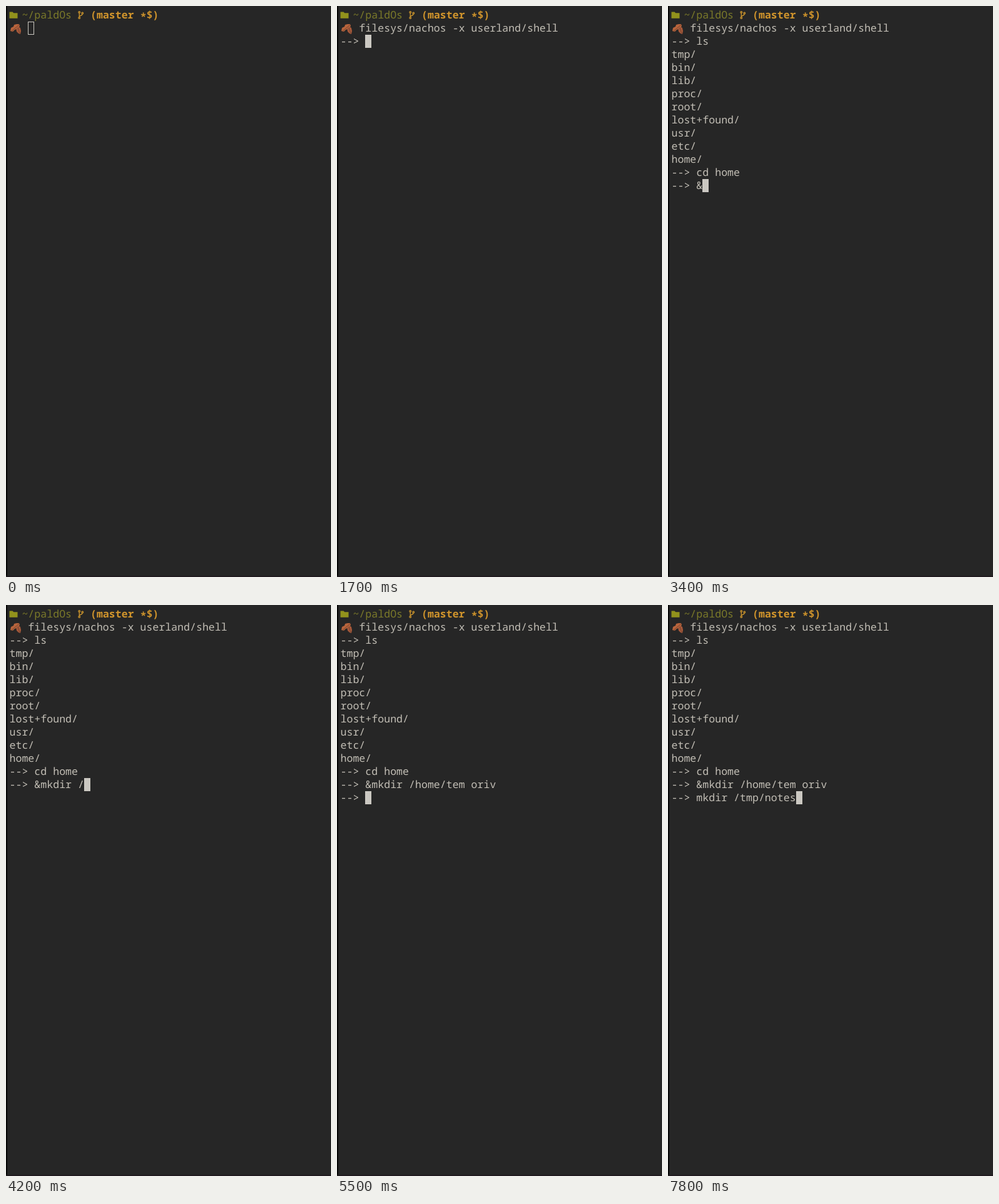
Recreate the animation shown at these times as an HTML page. Size 520x914 px, loop 8000 ms.

```html
<!DOCTYPE html>
<html lang="en">
<head>
<meta charset="utf-8">
<title>Shell session</title>
<style>
  html, body { margin: 0; width: 100%; height: 100%; overflow: hidden; background: #262626; }
  svg { display: block; width: 520px; height: 914px; }
  text {
    font: 16.6px "Noto Sans Mono", "DejaVu Sans Mono", monospace;
    text-rendering: geometricPrecision;
    white-space: pre;
    fill: #c2beb5;
  }
  .path { fill: #7b7a2a; }
  .branch { fill: #d0942c; font-weight: 700; }
  #cursor { fill: #cbc8c2; stroke: #cbc8c2; }
</style>
</head>
<body>
<svg viewBox="0 0 520 914">
  <rect width="520" height="914" fill="#262626"/>
  <rect width="2" height="914" fill="#070707"/>
  <rect y="912" width="520" height="2" fill="#201b1f"/>

  <!-- folder -->
  <path d="M5.500 9.500h5l1.700 1.800h6.300v8.500h-13z" fill="#92921c"/>
  <text class="path" x="25.400" y="20">~/paldOs</text>

  <!-- branch -->
  <g fill="none" stroke="#c38f2c" stroke-width="1.400">
    <path d="M117.300 11v7M122.300 12.500c0 3.500-5 2-5 5"/>
    <circle cx="117.300" cy="10" r="1.300"/>
    <circle cx="122.300" cy="11.500" r="1.300"/>
    <circle cx="117.300" cy="19" r="1.300"/>
  </g>
  <text class="branch" x="135" y="20">(master <tspan dy="3">*</tspan><tspan dy="-3">$)</tspan></text>

  <!-- fallen leaves -->
  <path d="M7 40l1-5 4-2 1-3 4-1 4 0 1 3-3 4-5 2-3 3z" fill="#b9643c"/>
  <path d="M16 36l4-3 3 2 1 5-1 5-3-1-3-3z" fill="#a5583a"/>
  <path d="M21 30l-7 6-6 5M19 35l3 9" fill="none" stroke="#74452f"/>

  <g id="rows"></g>
  <rect id="cursor"/>
</svg>
<script>
const LOOP = 8000, LEFT = 5.5, CELL = 9.96, PITCH = 21;
const PROMPT = "\n--> ";
const listing = "\n" + ["tmp", "bin", "lib", "proc", "root", "lost+found", "usr", "etc", "home"]
  .map(name => name + "/").join("\n");

// One entry per key press, a tenth of a second apart.
const keys = (start, parts) => [...parts].map((part, i) => [start + i * 100, part]);

const session = [
  [0, "   "],
  ...keys(200, ["f", "i", "l", "esys/"]),
  ...keys(800, ["n", "a", "chos "]),
  ...keys(1200, ["-x userland/", "shell"]),
  [1500, PROMPT],
  ...keys(1900, "ls"),
  [2200, listing + PROMPT],
  ...keys(2500, ["c", "d", " ", "ho", "me", PROMPT]),
  [3400, "&"],
  ...keys(3700, ["m", "k", "d", "ir", " ", "/", "h", "o", "m"]),
  ...keys(4600, ["e", "/", "t", "em", " ", "o", "ri", "v"]),
  [5500, PROMPT],
  ...keys(5900, "mkdir /"),
  [6800, "t"],
  ...keys(7000, "mp/notes")
];

const rows = document.getElementById("rows");
const cursor = document.getElementById("cursor");
const setAll = (node, attrs) => {
  for (const name in attrs) node.setAttribute(name, attrs[name]);
};

const lines = Array.from({ length: 14 }, (_, i) => {
  const line = document.createElementNS("http://www.w3.org/2000/svg", "text");
  setAll(line, { x: LEFT, y: 41 + i * PITCH });
  return rows.appendChild(line);
});

function drawCursor(time, row, column) {
  const hollow = time < 100;
  const inset = hollow ? 0.5 : 0;
  setAll(cursor, {
    x: Math.round(LEFT + column * CELL) + inset,
    y: 25 + row * PITCH + inset,
    width: 10 - 2 * inset,
    height: 21 - 2 * inset,
    "fill-opacity": hollow ? 0 : 1,
    "stroke-width": hollow ? 1 : 0,
    visibility: time >= 1300 && time < 1500 ? "hidden" : "visible"
  });
}

function draw(now) {
  const time = now % LOOP;
  const shown = session.filter(([at]) => at <= time).map(([, part]) => part).join("").split("\n");
  lines.forEach((line, i) => {
    const content = shown[i] || "";
    if (line.textContent !== content) line.textContent = content;
  });
  drawCursor(time, shown.length - 1, shown[shown.length - 1].length);
}

const started = performance.now();
function tick() {
  draw(performance.now() - started);
  requestAnimationFrame(tick);
}
tick();
</script>
</body>
</html>
```
